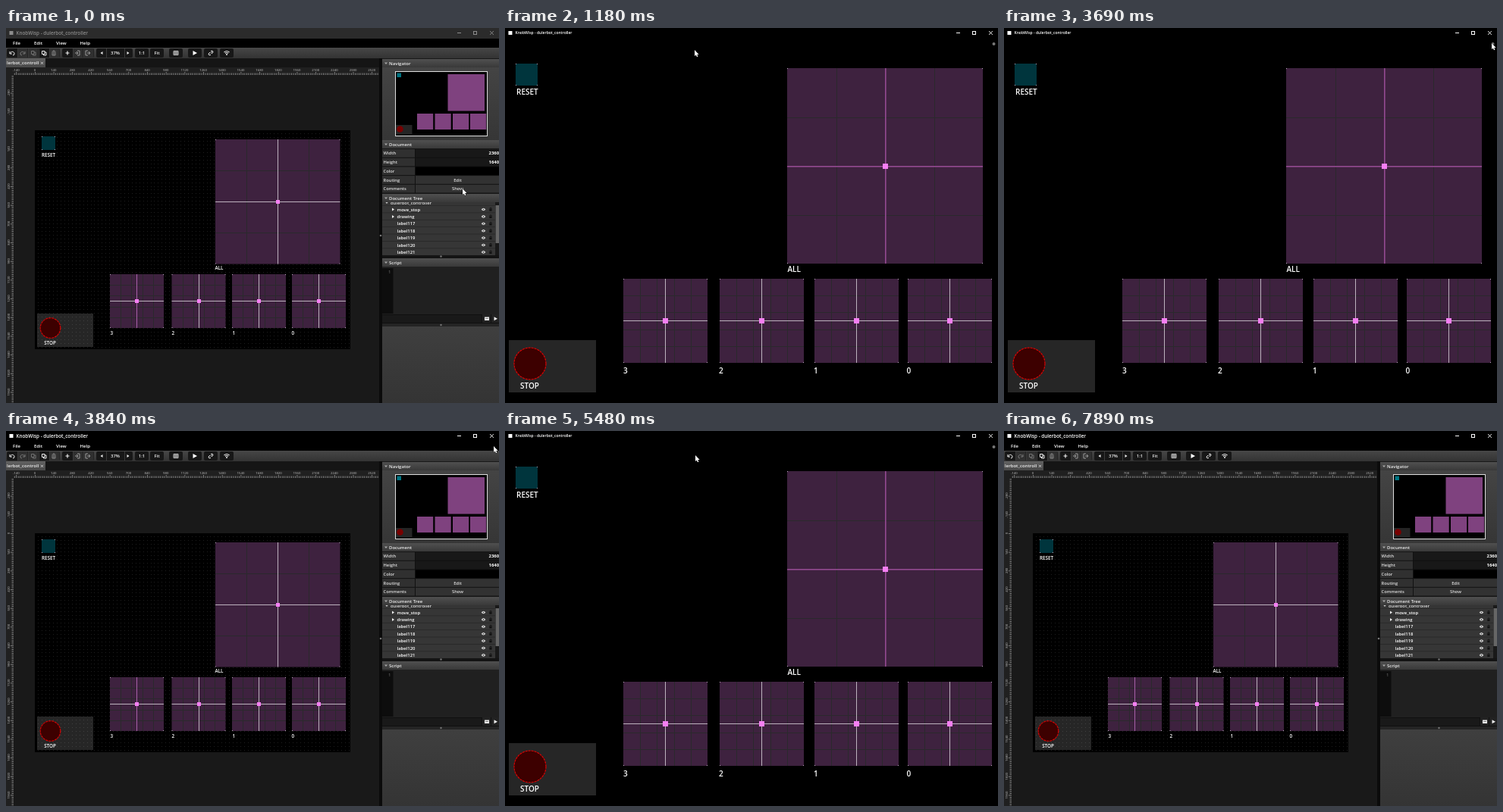
These frames come from a looping animation (650 by 495 pixels, 7940 ms). An HTML page with a canvas:

```html
<!DOCTYPE html>
<html lang="en">
<head>
<meta charset="utf-8">
<title>Controller editor</title>
<style>
html, body { margin: 0; width: 100%; height: 100%; overflow: hidden; background: #000; }
canvas { display: block; }
</style>
</head>
<body>
<canvas id="stage" width="650" height="495"></canvas>
<script>
const W = 650, H = 495, LOOP = 7940;
const TITLE = 'KnobWisp - dulerbot_controller';
const stage = document.getElementById('stage').getContext('2d');
let g = stage;

function rect(x, y, w, h, color) {
  g.fillStyle = color;
  g.fillRect(x, y, w, h);
}
function frame(x, y, w, h, color) {
  g.strokeStyle = color;
  g.lineWidth = 1;
  g.strokeRect(x + .5, y + .5, w - 1, h - 1);
}
function text(s, x, y, size = 6, color = '#eee', align = 'left', weight = 600) {
  g.font = `${weight} ${size}px "Open Sans", "Noto Sans", sans-serif`;
  g.textAlign = align;
  g.fillStyle = color;
  g.fillText(s, x, y);
}
function disc(x, y, r, color) {
  g.fillStyle = color;
  g.beginPath();
  g.arc(x, y, r, 0, 7);
  g.fill();
}
// SVG path drawn at an offset, filled or stroked
function shape(d, x, y, color, lineWidth = 0) {
  g.save();
  g.translate(x, y);
  const path = new Path2D(d);
  g.fillStyle = g.strokeStyle = color;
  g.lineWidth = lineWidth;
  lineWidth ? g.stroke(path) : g.fill(path);
  g.restore();
}
function gradient(x, y, w, h, top, bottom) {
  const fill = g.createLinearGradient(0, y, 0, y + h);
  fill.addColorStop(0, top);
  fill.addColorStop(1, bottom);
  rect(x, y, w, h, fill);
}
function corners(x, y, size) {
  for (const dx of [0, size - 1])
    for (const dy of [0, size - 1]) rect(x + dx, y + dy, 1, 1, '#b9a8bd');
}

function pad({ x, y, size, divisions, knob, line = 1, vertical = '#bdb2be', horizontal = '#bdb2be' }) {
  rect(x, y, size, size, '#3e223f');
  for (let i = 1; i < divisions; i++) {
    if (i * 2 === divisions) continue;
    const d = i * size / divisions;
    rect(Math.round(x + d), y, 1, size, '#2a292c');
    rect(x, Math.round(y + d), size, 1, '#2a292c');
  }
  const midX = Math.floor(x + size / 2), midY = Math.floor(y + size / 2);
  rect(midX, y, line, size, vertical);
  rect(x, midY, size, line, horizontal);
  const half = (knob - 1) / 2;
  rect(midX - half, midY - half, knob, knob, '#f57ff3');
  corners(x, y, size);
}

function board({ reset, all, small, stop, panel, font, labels, drawGrid }) {
  rect(...panel, '#262626');
  if (drawGrid) drawGrid();
  rect(...reset, reset[2], '#00353d');
  corners(...reset);
  pad({ ...all, divisions: 4 });
  small.xs.forEach((x, i) => {
    pad({ x, y: small.y, size: small.size, divisions: 5, knob: all.knob,
      vertical: i ? undefined : small.firstVertical });
    text(3 - i, labels.digits[i], labels.digitY, font, '#fff');
  });
  const [cx, cy, r] = stop;
  disc(cx, cy, r, '#3d0000');
  g.strokeStyle = '#e30000';
  g.lineWidth = 1.1;
  g.setLineDash([3, 1]);
  g.stroke();
  g.setLineDash([]);
  text('RESET', ...labels.reset, font, '#fff');
  text('ALL', ...labels.all, font, '#fff');
  text('STOP', ...labels.stop, font, '#fff', 'center');
}

function performScene() {
  rect(0, 0, W, H, '#000');
  board({
    reset: [14, 47, 29], panel: [5, 412, 115, 69], stop: [33, 443, 21], font: 10,
    all: { x: 372, y: 53, size: 258, knob: 7, line: 1.6, vertical: '#944a91', horizontal: '#944a91' },
    small: { xs: [156, 283, 408, 531], y: 331, size: 111 },
    labels: { reset: [15, 88], all: [372.5, 321.5], stop: [32.5, 476],
      digits: [156, 282, 407, 529.5], digitY: 455.5 }
  });
  disc(644.5, 21, 2, '#777');
}

function rulers() {
  const unit = 24.68, left = 38, top = 135;
  rect(0, 52, 492, 10, '#202020');
  rect(0, 52, 10, 443, '#202020');
  for (let i = -50; i < 190; i++) {
    const big = i % 10 === 0, x = left + i * unit / 10, y = top + i * unit / 10;
    const length = big ? 4 : 2.5;
    if (x > 10 && x < 492) rect(x, 62 - length, .8, length, '#999');
    if (y > 62 && y < H) rect(10 - length, y, length, .8, '#999');
    if (!big) continue;
    const value = i * 14;
    if (x > 10) text(value, x, 57, 4.3, '#999', 'center');
    if (y < 70) continue;
    g.save();
    g.translate(5, y);
    g.rotate(-Math.PI / 2);
    text(value, 0, 0, 4.3, '#999', 'center');
    g.restore();
  }
}

function toolbar() {
  gradient(0, 26, W, 14, '#474747', '#333');
  const groups = [[1, 70], [74, 42], [119, 48], [170, 18], [190, 18],
    [215, 18], [240, 18], [261, 18], [282, 18]];
  for (const [x, w] of groups) {
    g.fillStyle = '#171717';
    g.beginPath();
    g.roundRect(x, 27, w, 12, 2);
    g.fill();
  }
  for (const x of [15, 29, 57, 88, 102]) rect(x, 27, 13.5, 12, '#303030');
  for (const x of [15, 29, 43, 57, 88, 102, 132, 156]) rect(x, 27, 1, 12, '#3a3a3a');
  const undo = 'M-3-2V1H0M-3 1C-1-3 3-2 3 1Q3 3 1 3';
  shape(undo, 8, 33, '#eee', 1);
  shape('M3-2V1H0M3 1C1-3-3-2-3 1Q-3 3-1 3', 22, 33, '#777', 1);
  const copy = 'M-2.5-2.5H1V1.5H-2.5ZM-.5 1.5V3H3V-1H1';
  shape(copy, 36, 33, '#777', .9);
  shape(copy, 50, 33, '#eee', 1);
  shape('M-2.5-2H2.5M-1-3H1M-2-1V3H2V-1M0-1V3', 63, 33, '#888', 1);
  shape('M-2.5 0H2.5M0-2.5V2.5', 81, 33, '#eee', 1.2);
  shape('M0-3H3V3H0M-3 0H1M-1-2L1 0-1 2', 94, 33, '#999', 1);
  shape('M0-3H-3V3H0M-1 0H3M1-2L3 0 1 2', 108, 33, '#999', 1);
  shape('M1.5-2V2L-1.5 0Z', 126, 33, '#eee');
  shape('M-1.5-2V2L1.5 0Z', 161, 33, '#eee');
  text('37%', 144, 35.2, 6, '#eee', 'center');
  text('1:1', 179, 35.2, 6, '#eee', 'center');
  text('Fit', 199, 35.2, 6, '#eee', 'center');
  shape('M-3-2.5H3V2.5H-3ZM-3 0H3M-1-2.5V2.5M1-2.5V2.5', 224, 33, '#ddd', .9);
  shape('M-2.5-3V3L3 0Z', 249, 33, '#fff');
  shape('M-.5.5L1.5-1.5M0-2L1-3Q3-3 3-1L1 1M0 2L-1 3Q-3 3-3 1L-1-1', 270, 33, '#eee', 1);
  shape('M-3.5-.5Q0-3.5 3.5-.5M-2 1Q0-1 2 1', 291, 32.5, '#eee', 1.1);
  disc(291, 35, 1, '#eee');
}

function header(label, y) {
  gradient(496, y, 154, 11, '#505050', '#393939');
  shape('M-2-1H2L0 1.5Z', 501, y + 5.5, '#aaa');
  text(label, 505, y + 7.8, 6);
}

function navigator() {
  header('Navigator', 41);
  gradient(496, 52, 154, 96, '#444', '#363636');
  rect(513, 57, 122, 86, '#000');
  frame(513, 57, 122, 86, '#ddd');
  rect(515.5, 59.5, 5.5, 5.5, '#007482');
  rect(582.5, 61, 48.5, 48.5, '#7f427f');
  for (const x of [542, 565.5, 589, 612]) rect(x, 113, 21.2, 21, '#7f427f');
  rect(514, 128, 21.5, 12.5, '#252525');
  disc(519.5, 133.5, 4.3, '#780000');
}

function documentPanel() {
  header('Document', 148);
  ['Width', 'Height', 'Color', 'Routing', 'Comments'].forEach((label, i) => {
    const y = 159.5 + i * 11.7;
    rect(496, y, 154, 11.7, '#111');
    rect(496, y + .5, 43, 10.7, '#303030');
    rect(540, y + .5, 110, 10.7, ['#181818', '#181818', '#000', '#323232', '#323232'][i]);
    text(label, 497.5, y + 7.9, 5.8, '#ddd');
    if (i < 2) text([2360, 1640][i], 650, y + 7.9, 5.9, '#fff', 'right', 700);
    if (i > 2) text(['Edit', 'Show'][i - 3], 595.5, y + 7.9, 5.8, '#ddd', 'center');
  });
}

function treePanel() {
  rect(496, 230, 154, 70, '#262626');
  g.save();
  g.beginPath();
  g.rect(496, 230, 149, 70);
  g.clip();
  rect(496, 230, 149, 4.3, '#353535');
  text('dulerbot_controller', 507, 232.5, 5.8, '#ddd');
  shape('M-2-1H2L0 1.5Z', 502, 230.5, '#ccc');
  ['move_stop', 'drawing', 'label117', 'label118', 'label119', 'label120', 'label121'].forEach((label, i) => {
    const y = 234.8 + i * 9.4;
    rect(496, y, 149, 8.7, '#363636');
    text(label, 515.5, y + 6.7, 5.9, '#fff');
    if (i < 2) shape('M-1.5-2V2L1.5 0Z', 510.5, y + 4.7, '#eee');
    shape('M-2.8 0Q0-3.6 2.8 0Q0 3.6-2.8 0', 629.5, y + 4.7, '#ddd');
    disc(629.5, y + 4.7, .8, '#333');
    rect(637.3, y + 4.3, 3.2, 2.5, '#111');
    shape('M-1 0V-1.5H1V0', 639, y + 4.3, '#111', .8);
  });
  g.restore();
  rect(645, 230, 5, 70, '#191919');
  rect(645.5, 234, 4.5, 50, '#666');
  header('Document Tree', 219);
}

function scriptPanel() {
  rect(496, 300, 154, 4, '#141414');
  disc(573.5, 301.5, 1.2, '#777');
  header('Script', 304);
  rect(496, 315, 154, 63, '#202020');
  rect(496, 317, 14.5, 60, '#0d0d0d');
  text('1', 507, 323.5, 5, '#666', 'right');
  rect(496, 378, 154, 12, '#101010');
  rect(496, 379, 131, 10, '#191919');
  rect(628, 378, 11, 11, '#222');
  rect(640, 378, 10, 11, '#222');
  rect(631, 381.5, 6, 4.5, '#eee');
  rect(632, 383, 4, .7, '#555');
  shape('M-2-2.5V2.5L2.5 0Z', 645.5, 383.8, '#eee');
  rect(496, 390, 154, 4, '#242424');
  disc(573.5, 392, 1.2, '#777');
  gradient(496, 394, 154, 101, '#3f3f3f', '#343434');
}

function gridDots() {
  const step = 4.936;
  for (let y = 135 + step; y < 424; y += step)
    for (let x = 38 + step; x < 454; x += step)
      rect(Math.floor(x), Math.floor(y), 1, 1, 'rgba(255,255,255,.12)');
}

function editorScene() {
  rect(0, 0, W, H, '#191919');
  rect(0, 0, W, 26, '#000');
  [['File', 9], ['Edit', 37], ['View', 66], ['Help', 97.5]].forEach(([label, x]) => text(label, x, 22.3, 6, '#fff'));
  toolbar();
  rect(0, 40, 492, 12, '#151515');
  gradient(0, 40, 52, 12, '#626262', '#484848');
  text('lerbot_controll', 1, 48.3, 6);
  shape('M-1.5-1.5L1.5 1.5M1.5-1.5L-1.5 1.5', 47.5, 46.3, '#ddd', .9);
  rulers();
  rect(38, 135, 416, 289, '#000');
  board({
    drawGrid: gridDots,
    reset: [47, 143, 18], panel: [41, 377, 74, 44], stop: [58.5, 396, 13.3], font: 6.3,
    all: { x: 276, y: 147, size: 164.5, knob: 5 },
    small: { xs: [137, 218.5, 298, 377], y: 325, size: 71, firstVertical: '#a85fa8' },
    labels: { reset: [47, 169.5], all: [275.5, 318.7], stop: [58, 417.6],
      digits: [137.5, 218.5, 298.5, 376.5], digitY: 404.5 }
  });
  rect(492, 40, 4, 455, '#0b0b0b');
  disc(494, 274, 1.3, '#777');
  navigator();
  documentPanel();
  treePanel();
  scriptPanel();
}

function render(draw) {
  const layer = document.createElement('canvas');
  layer.width = W;
  layer.height = H;
  g = layer.getContext('2d');
  draw();
  g = stage;
  return layer;
}
const editor = render(editorScene), performer = render(performScene);

function titleBar(size, focused) {
  const color = focused ? '#fff' : '#8c8c8c';
  rect(0, 0, W, 14, focused ? '#000' : '#2b2b2b');
  rect(4.5, 4, 5, 5, color);
  text(TITLE, 13.5, size > 6 ? 8.8 : 8.4, size, color);
  rect(595, 6, 5, 1, color);
  frame(616, 4, 5, 5, color);
  shape('M-2.3-2.3L2.3 2.3M2.3-2.3L-2.3 2.3', 640.5, 6.5, color, 1);
}

// first step (ms), number of steps, step length (ms), end point
const moves = [
  [70, 17, 49.4, 252, 31], [910, 3, 50, 250, 29],
  [2150, 16, 51.3, 638, 27], [2970, 2, 50, 645, 21], [3190, 2, 50, 643, 20],
  [4040, 16, 52.6, 253, 30], [4880, 2, 50, 251, 32],
  [5800, 13, 50, 645, 22], [6570, 4, 50, 646, 21]
];
const ease = p => p * p * (3 - 2 * p);

function cursorAt(t) {
  let x = 602, y = 212;
  for (const [start, steps, length, endX, endY] of moves) {
    if (t < start) break;
    const p = ease(Math.min(1, (Math.floor((t - start) / length) + 1) / steps));
    x += (endX - x) * p;
    y += (endY - y) * p;
  }
  return [x, y];
}

function draw(t) {
  const performing = (t >= 1180 && t < 3840) || (t >= 5480 && t < 6970);
  g.drawImage(performing ? performer : editor, 0, 0);
  titleBar(performing ? 5 : 6.3, t >= 1130);
  if (t >= 7890) return;
  const arrow = 'M0 0V8L1.8 6.4 3 9.2 4.4 8.6 3.2 5.9H5.6Z';
  const [x, y] = cursorAt(t);
  shape(arrow, x, y, '#000', 1);
  shape(arrow, x, y, '#fff');
}

const begin = performance.now();
function tick() {
  draw((performance.now() - begin) % LOOP);
  requestAnimationFrame(tick);
}
tick();
</script>
</body>
</html>
```
